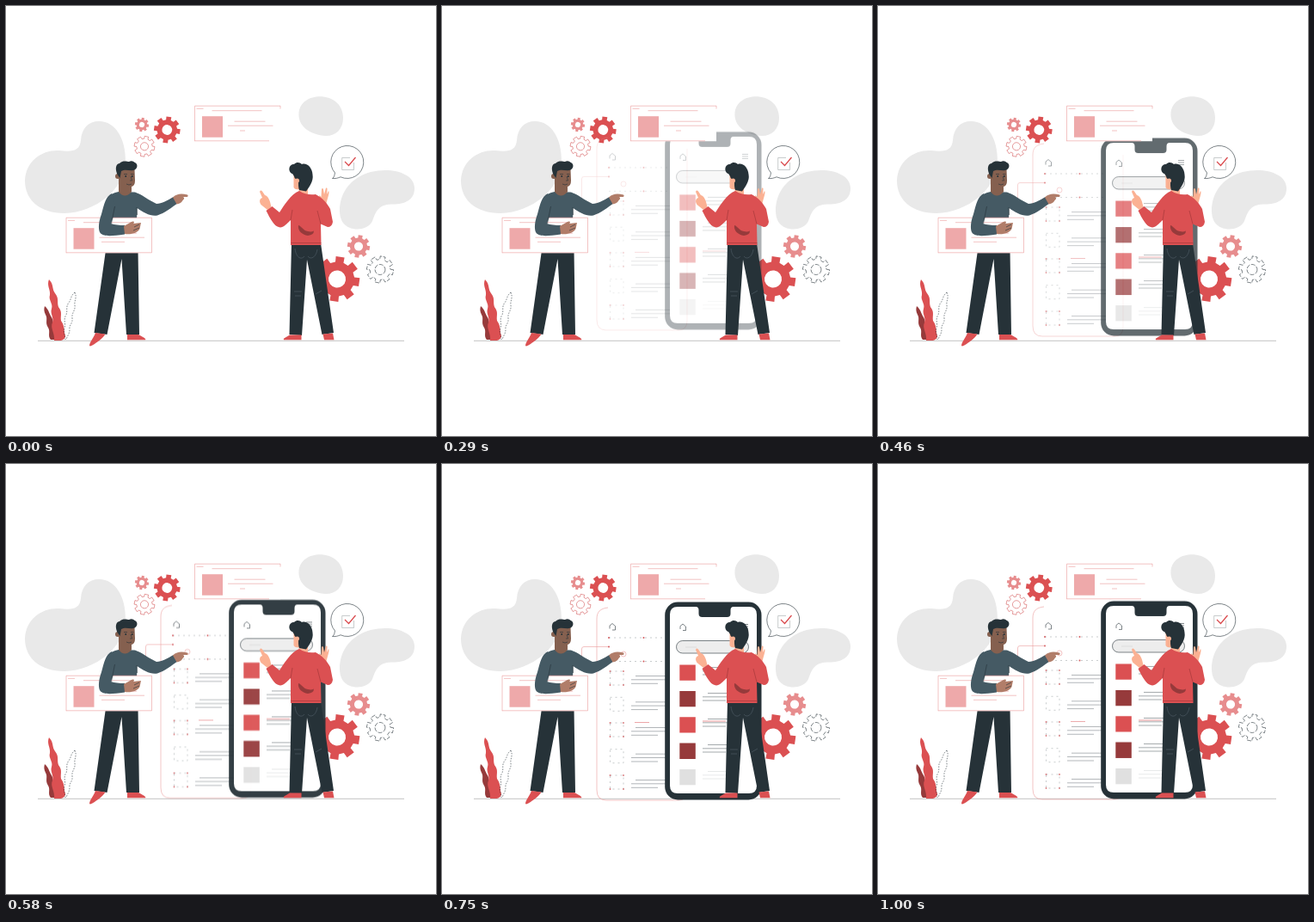
Recreate the animation shown at these times as an HTML page without scripts. Size 500x500 px, loop 1040 ms.

```html
<!DOCTYPE html>
<html lang="en">
<head>
<meta charset="utf-8">
<title>App design teamwork</title>
<style>
html, body { margin: 0; width: 100%; height: 100%; overflow: hidden; background: #fff; }
svg.stage { display: block; width: 100vw; height: 100vh; }
.rise { animation: rise 1040ms linear infinite; }
.thin { fill: none; stroke-width: .6; }
.pink { stroke: #eb9a9a; }
.ink { stroke: #263238; }
.grey { stroke: #a3a9ac; }
.red { fill: #db5052; }
.rose { fill: #e78d8e; }
.dark { fill: #263238; }
.wine { fill: #963a3b; }
.tan { fill: #b17d69; }
.peach { fill: #fbb193; }
.slate { fill: #455a64; }
.gear { vector-effect: non-scaling-stroke; }
@keyframes rise {
  0%, 3.8% { opacity: 0; transform: translateY(-23px); }
  3.85% { opacity: .01; transform: translateY(-22.8px); }
  11.5% { opacity: .07; transform: translateY(-20.8px); }
  20.2% { opacity: .22; transform: translateY(-17.5px); }
  36.5% { opacity: .54; transform: translateY(-10.5px); }
  44.2% { opacity: .72; transform: translateY(-7px); }
  55.8% { opacity: .94; transform: translateY(-2.6px); }
  62% { opacity: 1; transform: translateY(-.9px); }
  72.1% { opacity: 1; transform: translateY(0); }
  82% { opacity: 1; transform: translateY(-.2px); }
  96.2%, 100% { opacity: 1; transform: translateY(-1.1px); }
}
</style>
</head>
<body>
<svg class="stage" viewBox="0 0 500 500">
  <defs>
    <path id="gear" class="gear" fill-rule="evenodd" stroke-linejoin="round" d="M7.4-1.8L9.8-1.9V1.9L7.4 1.8L6.5 3.9L8.3 5.6L5.6 8.3L3.9 6.5L1.8 7.4L1.9 9.8H-1.9L-1.8 7.4L-3.9 6.5L-5.6 8.3L-8.3 5.6L-6.5 3.9L-7.4 1.8L-9.8 1.9V-1.9L-7.4-1.8L-6.5-3.9L-8.3-5.6L-5.6-8.3L-3.9-6.5L-1.8-7.4L-1.9-9.8H1.9L1.8-7.4L3.9-6.5L5.6-8.3L8.3-5.6L6.5-3.9Z M3.8 0A3.8 3.8 0 1 0-3.8 0A3.8 3.8 0 1 0 3.8 0Z"/>
    <g id="card">
      <path fill="#fff" d="M0 0H99.5V41H0Z"/>
      <path fill="#eea9aa" d="M8.5 12H32.5V36.5H8.5Z"/>
      <path class="thin pink" stroke-width=".8" d="M2 3.2H10M20 5.5H78M46 18H82M38.500 23H91M0 41V0H99.500"/>
    </g>
    <g id="row">
      <path class="thin grey" stroke-dasharray="2 4" d="M195.500 241H211V257H195.500Z"/>
      <path class="thin ink" opacity=".6" d="M225 246.500H265M220 250.800H265M220 255.300H251"/>
    </g>
    <g id="dots" fill="#d9777a">
      <circle cx="195.500" cy="241" r=".9"/><circle cx="211" cy="241" r=".9"/>
      <circle cx="195.500" cy="257" r=".9"/><circle cx="211" cy="257" r=".9"/>
    </g>
    <path id="text" class="thin ink" opacity=".7" d="M309 235.500H336M303 239.800H336M303 244H330"/>
    <path id="home" class="thin ink" d="M277 191V187.500L280 185L283.500 188V192.500H280"/>
  </defs>

  <g fill="#e9e9e9">
    <path d="M22 203C23 180 42 167 62 168C78 170 86 168 87 156C88 142 96 134 108 134C128 134 139 155 139 180C139 212 105 240 68 241C40 241 22 226 22 203Z"/>
    <path d="M340.500 124C342 110 356 104 369 105.500C383 107 392 117 392 130C392 143 384 151 372 151C354 150 339 140 340.500 124Z"/>
    <path d="M388 238C388 216 402 199 424 193C448 187 475 194 475 212C475 226 463 231 448 230.500C432 231 430 240 426 250C421 260 408 261 400 258C392 255 388 248 388 238Z"/>
  </g>
  <path class="thin" stroke="#999" stroke-width=".8" d="M37 389.300H463"/>

  <use href="#gear" class="red" transform="translate(385 317.500) rotate(8) scale(2.650)"/>
  <use href="#gear" class="red" transform="translate(187.300 144) rotate(8) scale(1.550)"/>
  <use href="#gear" class="rose" transform="translate(158 138) rotate(10) scale(.820)"/>
  <use href="#gear" class="rose" transform="translate(410 279.500) rotate(10) scale(1.330)"/>
  <use href="#gear" class="thin" stroke="#d4585a" transform="translate(161 163.300) rotate(12) scale(1.200)"/>
  <use href="#gear" class="thin ink" stroke-dasharray="5 1.500" transform="translate(435 306.500) rotate(12) scale(1.570)"/>

  <!-- plant -->
  <path class="wine" d="M45 349C50 353 50 358 53 362C56 367 53 371 57 376L60 388H52C48 383 52 379 49 374C45 368 49 364 46 359C44 355 44 352 45 349Z"/>
  <path class="red" d="M50 318C56 324 53 329 57 334C62 340 59 344 61 350C66 356 63 360 64 366C69 373 67 379 69 383C69 387 66 389 62 389H56C57 380 51 375 54 368C56 362 51 358 53 352C55 346 49 342 51 336C52 330 47 325 50 318Z"/>
  <path class="thin ink" stroke-dasharray="1.500 1.500" d="M80 333C75 337 76 341 73 345C69 350 72 354 70 359C66 365 70 369 68 374C66 380 69 383 69 388M80 333C83 339 79 343 80 348C81 354 76 357 77 363C78 369 73 371 74 376C74 381 71 384 70 388"/>

  <!-- check bubble -->
  <path class="thin ink" d="M382.500 194A19 19 0 1 1 389 198.800C386 200 383 201 379.500 200.500C382 199 382 196 382.500 194Z" style="fill:#fff"/>
  <path class="thin grey" d="M400 176.500H390.700V190.500H404.500V182"/>
  <path fill="none" stroke="#d9484b" stroke-width="1.200" d="M394 181L398.500 185.500L406.500 176"/>

  <!-- wireframe screen -->
  <g class="rise">
    <path class="thin pink" d="M193 167C184 168 180 172 180 180V379Q180 391 191 391H275Q285 391 285 380V180"/>
    <path class="thin pink" d="M162.500 238V215Q162.500 212.500 165 212.500H194"/>
    <use href="#home" x="-82" y=".500"/>
    <path class="thin grey" stroke-dasharray="2 4" d="M194 202H265M194 229.500H265"/>
    <g fill="#d45d60">
      <circle cx="194" cy="202" r="1"/><circle cx="234.500" cy="202" r="1"/>
      <circle cx="194" cy="212.500" r="1"/><circle cx="234.500" cy="229.500" r="1"/>
    </g>
    <circle class="thin pink" cx="211" cy="221" r="3"/>
    <use href="#row"/><use href="#row" y="30.300"/><use href="#row" y="60"/><use href="#row" y="90.700"/><use href="#row" y="121"/>
    <use href="#dots"/><use href="#dots" y="60"/><use href="#dots" y="121"/>
    <path class="thin" stroke="#e06b6d" d="M224 300.500H241"/>
  </g>

  <!-- phone -->
  <g class="rise">
    <rect class="dark" x="259.200" y="160.500" width="112.300" height="230" rx="15"/>
    <path fill="#fff" d="M274 166H295Q298.500 166 298.500 170V174Q298.500 178 302.500 178H331.500Q335.500 178 335.500 174V170Q335.500 166 339 166H357Q366 166 366 175V374Q366 383 357 383H274Q265 383 265 374V175Q265 166 274 166Z"/>
    <use href="#home" y="1"/>
    <path class="thin ink" d="M349 186.500H356M349 189H356M349 191.500H356"/>
    <rect class="thin ink" x="272.500" y="205.500" width="84" height="14.500" rx="7.250" style="fill:#ededed"/>
    <path fill="none" stroke="#ddd" d="M283 213H296"/>
    <path class="red" d="M276.300 233.500h18.500v18.300h-18.500zM276.300 294.300h18.500v18.300h-18.500z"/>
    <path class="wine" d="M276.300 263.900h18.500v18.300h-18.500zM276.300 324.600h18.500v18.300h-18.500z"/>
    <path fill="#e0e0e0" d="M276.300 355h18.500v18.300h-18.500z"/>
    <use href="#text" y="1"/><use href="#text" y="31"/><use href="#text" y="61"/><use href="#text" y="91"/>
    <g opacity=".25"><use href="#text" y="122"/></g>
    <path class="thin" stroke="#db5052" d="M303 299H330"/>
  </g>

  <use href="#card" x="219.500" y="116.200"/>
  <path class="thin pink" d="M219.500 156.800H306M319 116V119.500M272 145H278"/>

  <!-- left person -->
  <path class="dark" d="M116 284H153.500L155 382H140L134.500 294L117.500 382L102.500 380Z"/>
  <path class="red" d="M104 380L115.500 381.500C112 387 107 390 103 393Q98 396.500 97 395C97 391 102 386 104 380ZM141 382H154L161 386Q163 388 162 388.300H141Z"/>
  <path class="slate" d="M131 216C125 217 121 219 119 224L122 250H152L152.500 235C160 240 168 245 176 243.500C184 241 193 234 200 229L194.500 222C188 226 181 230 175 230C166 226 158 219 150 216.500Z"/>
  <path class="tan" d="M194 222.500C199 218 204 218 211 219.500Q212.500 221 210.500 222H206C208 223 207 225 205.500 226C204 229 201 230 198.500 230.500Z"/>
  <path fill="#85604f" d="M131 200V216Q138 225 146 216V210Q150 209 150 203L149.500 190H132Z"/>
  <circle cx="130" cy="198" r="3" fill="#85604f"/>
  <path class="dark" d="M129.500 196C127 190 127 184 132 183C136 179 141 181 143 181C147 179 149 182 150 182C154 184 153 190 148 191C143 192 139 189 134 192L132.500 200Z"/>
  <path class="thin ink" d="M137 195.500H141M145 195.500H148.500M145 198L146.500 203H144M140 207Q143 209 146 207"/>
  <path class="dark" d="M138.500 197h1.500v2h-1.500zM146 197h1.500v2h-1.500z"/>
  <use href="#card" x="70" y="246.200"/>
  <path class="thin pink" d="M70 286.800H169.500V246.200M111 274.300H138"/>
  <path class="slate" d="M123 218C116 221 114 231 111 242C108 250 107 258 109 263C112 268 120 268 138 265.500V255C132 255 126 254.500 122 253L128 235Z"/>
  <path class="tan" d="M137 256L145 251.500C149 249 150 251.500 148 253L157 252L155.500 259C153 264 146 266 138 265Z"/>
  <path class="thin ink" d="M122.500 253L126.500 233M152 234L152.500 243M149 257L155 254M148 261L155 258"/>

  <!-- right person -->
  <path class="dark" d="M332 276H366L381 380L367.500 382L350 295L344 383L329.500 382Z"/>
  <path class="thin" stroke="#52616a" d="M336 282C337 292 343 296 347 291M351 291C355 296 361 291 362 283M335 332H344M336 337H343M360 335L367 331"/>
  <path class="red" d="M330 382.500H343.500V388.300H323Q322 387 324 386ZM368.500 381.500L380 380.500L381.500 388.300H370Z"/>
  <path class="peach" d="M366.500 229L364 221Q364 219 366.500 222L367 213Q368 211 369 213L370 219L372 211.500Q374 211 373.500 213L373 219L375 215Q376 216 375 220L372 231Z"/>
  <path class="peach" d="M304 237L296.500 231C294 227 295 224 298 223L295 216Q296 213.500 298 215.500L301 220C305 221 307 226 308.500 234Z"/>
  <path class="peach" d="M334.500 196V211Q336 214 340.500 213V220H351V195Z"/>
  <path class="dark" d="M331 194C327 189 331 183 335 184C338 181 342 182 344 184C350 182 356 188 356.500 196C358 204 352 211 349 215.500L341 214C339 209 341 204 339 201Q336 202 335 198Q334 195 331 194Z"/>
  <circle class="peach" cx="338.500" cy="203" r="2.500"/>
  <path class="red" d="M341 215C347 219 354 220 360 219C368 223 374 230 377 236L380 251Q379 257 374 257L366 253.500L366.500 278H331V249C326 254 321 259 317 257C312 256 307 247 302.500 238L309.500 233L318 240C324 231 331 219 341 215Z"/>
  <path class="wine" d="M340 255C344 256 345 261 351 262Q355 263 358 261.500Q358 266 351 267C344 266 339 261 340 255Z"/>
  <path class="thin" stroke="#9d3436" d="M331 249L333 237M331.500 275.500H366.500M366 253.500L362 238"/>
</svg>
</body>
</html>
```
